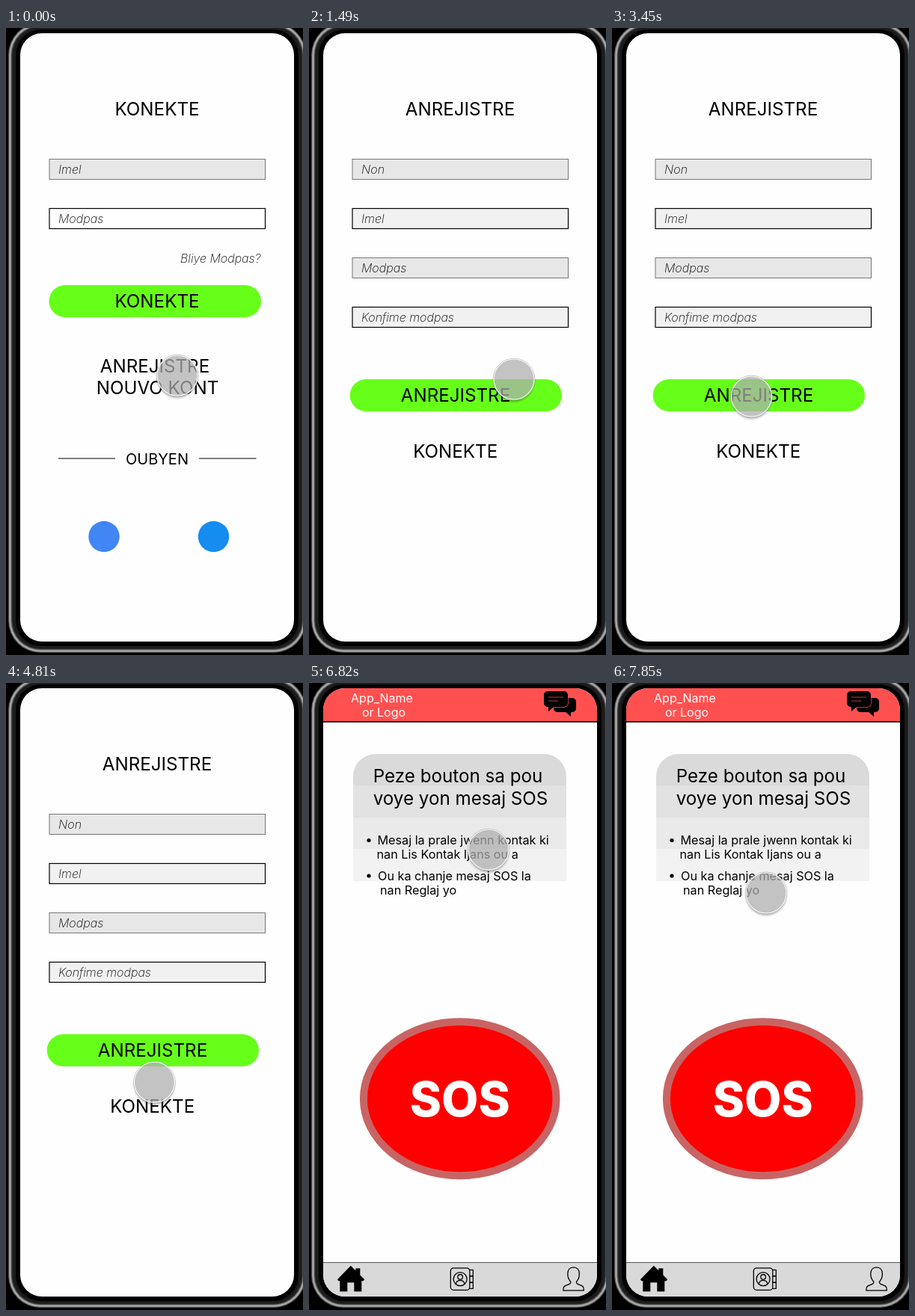
Recreate the animation shown at these times as an HTML page. Size 397 by 839 pixels, loop 7990 ms.

```html
<!DOCTYPE html>
<html lang="ht">
<head>
<meta charset="utf-8">
<title>Konekte</title>
<style>
  html, body { margin: 0; width: 100%; height: 100%; overflow: hidden; background: #000; }
  svg { display: block; width: 100%; height: 100%; }
  text { font-family: Inter, Roboto, sans-serif; font-optical-sizing: none; white-space: pre; }
  .big { font-size: 24.2px; text-anchor: middle; }
  .hint { font-size: 16px; font-style: italic; font-weight: 200; }
  .note { font-size: 16.2px; }
  .go { fill: #66ff1a; }
  .line { fill: none; stroke: #000; stroke-width: 1.3; stroke-linejoin: round; stroke-linecap: round; }
</style>
</head>
<body>
<svg viewBox="0 0 397 839" xmlns="http://www.w3.org/2000/svg">
  <defs>
    <clipPath id="glass"><rect x="19" y="7" width="366" height="814" rx="29"/></clipPath>
    <linearGradient id="card" x1="0" x2="0" y1="0" y2="1"></linearGradient>
    <filter id="blur" x="-50%" y="-50%" width="200%" height="200%"><feGaussianBlur stdDeviation="1.8"/></filter>
    <mask id="outside" maskUnits="userSpaceOnUse" x="-40" y="-40" width="80" height="80">
      <rect x="-40" y="-40" width="80" height="80" fill="#fff"/>
      <circle r="27.5"/>
    </mask>
  </defs>

  <rect width="397" height="839"/>
  <g id="rim"></g>

  <g clip-path="url(#glass)">
    <rect x="19" y="7" width="366" height="814" fill="#fefefe"/>

    <g id="login">
      <text class="big" x="202" y="117">KONEKTE</text>
      <text class="hint" x="340.5" y="313.5" text-anchor="end">Bliye Modpas?</text>
      <rect class="go" x="57.5" y="344" width="283.5" height="43" rx="21.5"/>
      <text class="big" x="202" y="374">KONEKTE</text>
      <text class="big" x="199" y="461">ANREJISTRE</text>
      <text class="big" x="202.5" y="490">NOUVO KONT</text>
      <path d="M70 576H146M258 576H334.5" stroke="#000"/>
      <text x="202" y="584" font-size="20" text-anchor="middle">OUBYEN</text>
      <circle cx="131" cy="680.5" r="20.7" fill="#4285f4"/>
      <circle cx="277.5" cy="680.5" r="20.7" fill="#148cf0"/>
    </g>

    <g id="signup" visibility="hidden">
      <text class="big" x="202" y="117">ANREJISTRE</text>
      <rect class="go" x="54.7" y="470" width="283.3" height="43" rx="21.5"/>
      <text class="big" x="196" y="500">ANREJISTRE</text>
      <text class="big" x="195.7" y="574.5">KONEKTE</text>
    </g>

    <g id="home" visibility="hidden">
      <rect x="19" y="7" width="366" height="45" fill="#ff5050"/>
      <path d="M19 52H385" stroke="#000" stroke-width="1.4"/>
      <g fill="#fff" font-size="16" text-anchor="middle">
        <text x="97.5" y="25.5">App_Name</text>
        <text x="100" y="45">or Logo</text>
      </g>
      <!-- chat bubbles -->
      <path d="M334 20H352a5 5 0 0 1 5 5v9a5 5 0 0 1-5 5h-2v6l-7-6h-11a5 5 0 0 1-5-5V25z"/>
      <path d="M319 11H341a5 5 0 0 1 5 5V27a5 5 0 0 1-5 5H327l-7 6v-6h-1a5 5 0 0 1-5-5V16a5 5 0 0 1 5-5z" stroke="#ff5050" stroke-width="1.4" paint-order="stroke"/>
      <path d="M320 19H340M320 24H333" stroke="#7d2a2a" stroke-width="1.3"/>

      <path d="M59 265V125a30 30 0 0 1 30-30H314a30 30 0 0 1 30 30V265z" fill="url(#card)"/>
      <text class="big" x="199" y="133">Peze bouton sa pou</text>
      <text class="big" x="202.5" y="163">voye yon mesaj SOS</text>
      <circle cx="80" cy="210.5" r="2.6"/>
      <text class="note" x="91.5" y="216">Mesaj la prale jwenn kontak ki</text>
      <text class="note" x="90.5" y="235">nan Lis Kontak Ijans ou a</text>
      <circle cx="80" cy="258" r="2.6"/>
      <text class="note" x="92" y="263.5">Ou ka chanje mesaj SOS la</text>
      <text class="note" x="95" y="283">nan Reglaj yo</text>

      <ellipse cx="201.7" cy="556.2" rx="128.8" ry="103" fill="#f00" stroke="#c96464" stroke-width="10"/>
      <text x="201.7" y="579.5" font-size="64" font-weight="800" fill="#fff" text-anchor="middle">SOS</text>

      <rect x="19" y="775" width="366" height="46" fill="#d9d9d9"/>
      <path d="M19 775.5H385" stroke="#555"/>
      <g transform="translate(.3 -.7)">
        <!-- house -->
        <path d="M37.5 799 55.500 780.500 62 787V784H68V793L74 799 72 801H70V815H60V803H51V815H41V801H39.500z"/>
        <!-- contacts -->
        <g class="line">
          <rect x="189" y="783.5" width="25.5" height="29.5" rx="4"/>
          <path d="M214.500 786h4.500v8h-4.500m0 .5h4.500v8h-4.500m0 .5h4.500v8h-4.500"/>
          <circle cx="201.8" cy="798.3" r="9"/>
          <circle cx="201.8" cy="795.5" r="3.3"/>
          <path d="M196 804.5q1-4.500 5.800-4.500t5.800 4.500"/>
        </g>
        <!-- person -->
        <path class="line" d="M339.500 813.500c0-5 1.500-6 5-7.200 4-1.300 5-2 5-4.300-2.800-3-4-6.500-4-10.500 0-5.500 3-9 7.800-9s7.800 3.500 7.800 9c0 4-1.200 7.500-4 10.500 0 2.300 1 3 5 4.300 3.500 1.200 5 2.200 5 7.200z"/>
      </g>
    </g>
  </g>

  <g id="touch">
    <g mask="url(#outside)"><circle cy="3" r="27" opacity=".3" filter="url(#blur)"/></g>
    <circle r="27.8" fill="#aeaeae" fill-opacity=".73"/>
    <circle r="27.8" fill="none" stroke="#999" stroke-width=".6"/>
    <circle r="27" fill="none" stroke="#fff" stroke-width="1.1"/>
  </g>
</svg>
<script>
  const LOOP = 7990, BEAT = 128;
  const screens = [["login", 0], ["signup", 140], ["home", 6030]];
  const byId = id => document.getElementById(id);

  function add(parent, tag, attrs, text = "") {
    const el = document.createElementNS("http://www.w3.org/2000/svg", tag);
    for (const key in attrs) el.setAttribute(key, attrs[key]);
    el.textContent = text;
    byId(parent).append(el);
  }

  // metal edge: nested outlines, brightest just inside the rim
  for (let d = 0; d < 10; d += 0.5) {
    const v = Math.round(28 + 150 * Math.exp(-(((d - 2.2) / 1.9) ** 2)));
    add("rim", "rect", {
      x: 3 + d, y: d - 7, width: 398 - 2 * d, height: 843 - 2 * d, rx: 43 - d, fill: `rgb(${v},${v},${v})`
    });
  }
  add("rim", "rect", { x: 13, y: 2, width: 378, height: 825, rx: 34 });

  // card shading in four flat bands
  for (let i = 0; i < 4; i++) {
    const v = 218 + 8 * i;
    for (const edge of [i, i + 1]) add("card", "stop", { offset: edge / 4, "stop-color": `rgb(${v},${v},${v})` });
  }

  function fields(screen, labels, plain) {
    labels.forEach((label, i) => {
      const y = 175.5 + 66 * i, soft = i % 2 === 0;
      add(screen, "rect", {
        x: 58, y, width: 288.5, height: 27,
        fill: soft ? "#e7e7e7" : plain, stroke: soft ? "#777" : "#000", "stroke-width": soft ? 1 : 1.2
      });
      add(screen, "text", { class: "hint", x: 70, y: y + 19.7 }, label);
    });
  }
  fields("login", ["Imel", "Modpas"], "#fff");
  fields("signup", ["Non", "Imel", "Modpas", "Konfime modpas"], "#f1f1f1");

  const linear = u => u;
  const easeOut = u => 1 - (1 - u) ** 2.5;
  const smooth = u => u * u * (3 - 2 * u);

  // each move starts where the one before ended; via bends the path
  const moves = [
    { at: 0, end: 0, to: [229, 465] },
    { at: 970, end: 1490, to: [274, 470] },
    { at: 1610, end: 1730, to: [210, 138], via: [356, 316] },
    { at: 1860, end: 2120, to: [194, 245], via: [208, 80] },
    { at: 2250, end: 2920, to: [169, 491], via: [164, 440], ease: easeOut },
    { at: 3060, end: 3720, to: [204, 495] },
    { at: 4000, end: 4410, to: [199, 557] },
    { at: 4550, end: 5300, to: [204.5, 493.7], via: [196, 530], ease: smooth },
    { at: 6570, end: 6820, to: [240, 223], via: [212, 340], ease: smooth },
    { at: 6950, end: 7310, to: [369, 100], via: [300, 30] },
    { at: 7440, end: 7850, to: [206, 281], via: [177, 209] }
  ];

  // the pointer is held between beats
  function place(t) {
    const i = moves.findLastIndex(m => m.at <= t);
    const { at, end, to, via, ease = linear } = moves[i];
    const from = i ? moves[i - 1].to : to;
    const beats = Math.round((end - at) / BEAT) + 1;
    const gap = (end - at) / (beats - 1) || BEAT;
    const u = ease(Math.min(1, (Math.floor((t - at) / gap + 1e-6) + 1) / beats));
    return to.map((b, k) => {
      const a = from[k], c = via ? via[k] : (a + b) / 2;
      return a * (1 - u) ** 2 + 2 * c * u * (1 - u) + b * u * u;
    });
  }

  function draw(t) {
    const now = screens.findLast(s => s[1] <= t)[0];
    for (const [id] of screens) byId(id).setAttribute("visibility", id === now ? "visible" : "hidden");
    byId("touch").setAttribute("transform", `translate(${place(t)})`);
  }

  const start = performance.now();
  function tick() {
    draw((performance.now() - start) % LOOP);
    requestAnimationFrame(tick);
  }
  tick();
</script>
</body>
</html>
```
